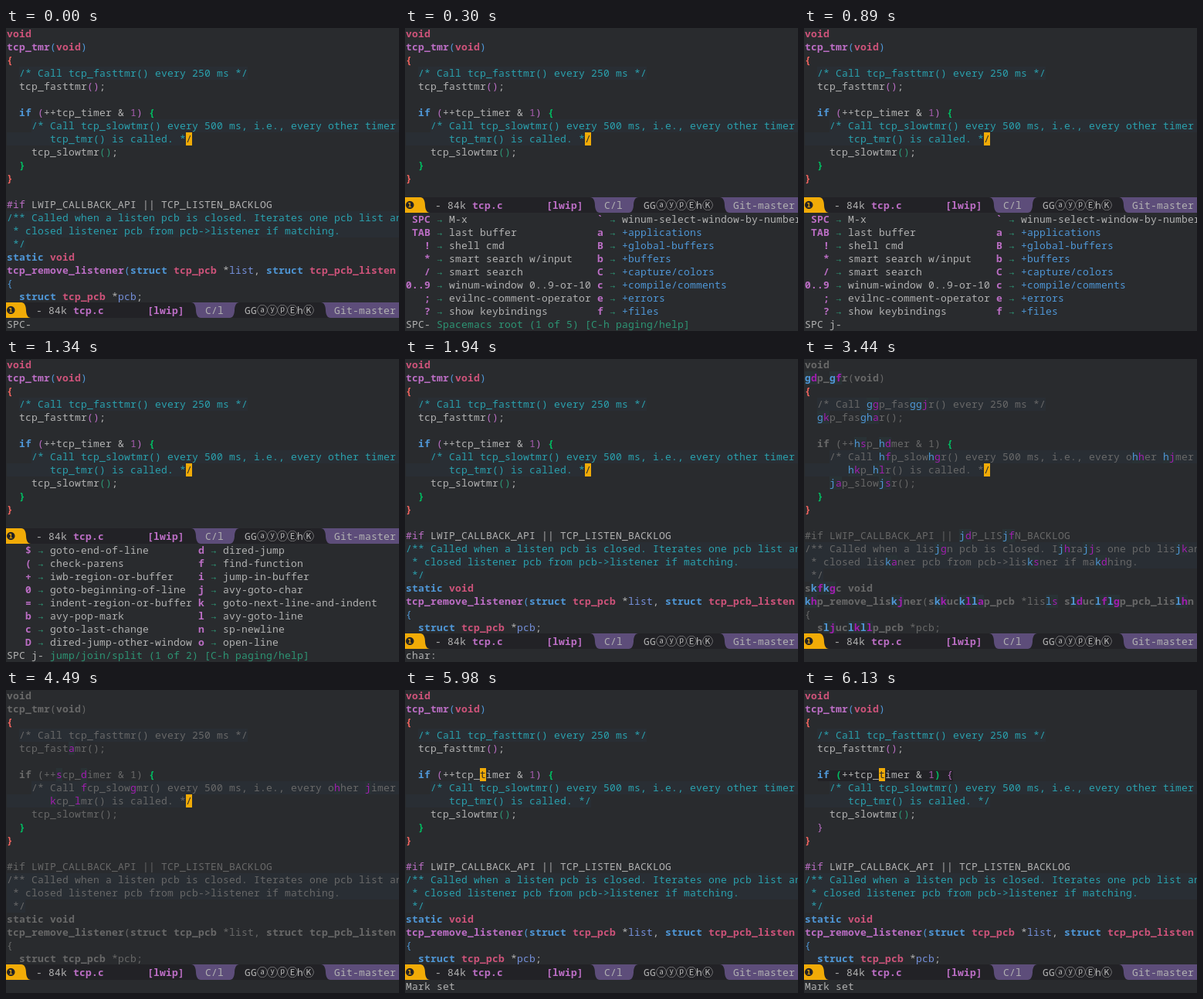
Write an HTML page with a canvas that moves like this. It is 509 px wide and 392 px high and loops after 8480 ms.

```html
<!DOCTYPE html>
<html lang="en">
<meta charset="utf-8">
<title>Jump to a character</title>
<style>
  html, body { margin: 0; width: 100%; height: 100%; overflow: hidden; background: #292b2e; }
  canvas { display: block; }
</style>
<canvas id="stage" width="509" height="392"></canvas>
<script>
const ctx = document.getElementById('stage').getContext('2d');
const W = 509, H = 392, CELL = 8, ROW = 17, LEFT = 1, LOOP = 8480;
const BG = '#292b2e', FG = '#b2b2b2', DIM = '#686868', BAR = '#222226', PURPLE = '#5d4d7a',
  YELLOW = '#f1ab07', BLUE = '#4f97d7', PINK = '#bc6ec5', GREEN = '#2d9574',
  COMMENT_BG = '#292e34', LABEL_BG = '#293235', LABEL = '#a31db1';
const MONO = '"Noto Sans Mono", "DejaVu Sans Mono", monospace';
const SYMBOLS = '"DejaVu Sans", "Noto Sans CJK JP", sans-serif';

// style letter -> [colour, bold]
const STYLES = {
  '.': [FG], c: ['#2aa1ae'], k: [BLUE, 1], f: [PINK, 1], t: ['#ce537a', 1], v: ['#7590db'],
  p: [PINK], n: ['#a45bad'], 1: [BLUE], 2: [PINK], 3: [GREEN],
  r: ['#f2645f', 1], g: ['#00bd62', 1], q: [PINK],
};

// segments are split by ~ and start with their style letter
const CODE = [
  'tvoid',
  'ftcp_tmr~1(~tvoid~1)',
  'r{',
  '.  ~c/* Call tcp_fasttmr() every 250 ms */',
  '.  tcp_fasttmr~2()~.;',
  '',
  '.  ~kif~. ~q(~.++tcp_timer & ~n1~q)~. ~g{',
  '.    ~c/* Call tcp_slowtmr() every 500 ms, i.e., every other timer',
  'c       tcp_tmr() is called. */',
  '.    tcp_slowtmr~3()~.;',
  '.  ~g}',
  'r}',
  '',
  'p#if~. LWIP_CALLBACK_API || TCP_LISTEN_BACKLOG',
  'c/** Called when a listen pcb is closed. Iterates one pcb list and the',
  'c * closed listener pcb from pcb->listener if matching.',
  'c */',
  'kstatic~. ~tvoid',
  'ftcp_remove_listener~1(~kstruct~. ~ttcp_pcb~. *~vlist~., ~kstruct~. ~ttcp_pcb_listen',
  '1{',
  '.  ~kstruct~. ~ttcp_pcb~. *~vpcb~.;',
].map(line => line.split('~').flatMap(s => [...s.slice(1)].map(ch => ({ ch, style: s[0] }))));

// two-key jump labels for every "t", in reading order
const KEYS = 'asdfghjkl';
const LABELS = [];
CODE.forEach((line, row) => line.forEach(({ ch }, col) => {
  if (!/t/i.test(ch)) return;
  const n = LABELS.length + 38;
  LABELS.push({ row, col, keys: KEYS[Math.floor(n / 9)] + KEYS[n % 9] });
}));

// rows of: key, text, key, text
const ROOT_KEYS = [
  ['SPC', 'M-x', '`', 'winum-select-window-by-number'],
  ['TAB', 'last buffer', 'a', '+applications'],
  ['!', 'shell cmd', 'B', '+global-buffers'],
  ['*', 'smart search w/input', 'b', '+buffers'],
  ['/', 'smart search', 'C', '+capture/colors'],
  ['0..9', 'winum-window 0..9-or-10', 'c', '+compile/comments'],
  [';', 'evilnc-comment-operator', 'e', '+errors'],
  ['?', 'show keybindings', 'f', '+files'],
];
const JUMP_KEYS = [
  ['$', 'goto-end-of-line', 'd', 'dired-jump'],
  ['(', 'check-parens', 'f', 'find-function'],
  ['+', 'iwb-region-or-buffer', 'i', 'jump-in-buffer'],
  ['0', 'goto-beginning-of-line', 'j', 'avy-goto-char'],
  ['=', 'indent-region-or-buffer', 'k', 'goto-next-line-and-indent'],
  ['b', 'avy-pop-mark', 'l', 'avy-goto-line'],
  ['c', 'goto-last-change', 'n', 'sp-newline'],
  ['D', 'dired-jump-other-window', 'o', 'open-line'],
];

const SCENES = [
  { at: 0, echo: 'SPC-' },
  { at: 300, keys: ROOT_KEYS, echo: 'SPC-', hint: 'Spacemacs root (1 of 5) [C-h paging/help]' },
  { at: 890, keys: ROOT_KEYS, echo: 'SPC j-' },
  { at: 1340, keys: JUMP_KEYS, echo: 'SPC j-', hint: 'jump/join/split (1 of 2) [C-h paging/help]' },
  { at: 1940, echo: 'char:' },
  { at: 3440, dim: true, typed: '' },
  { at: 4490, dim: true, typed: 'h' },
  { at: 5980, moved: true, echo: 'Mark set' },
  { at: 6130, moved: true, settled: true, echo: 'Mark set' },
];

function box(color, x, y, w, h) {
  ctx.fillStyle = color;
  ctx.fillRect(x, y, w, h);
}

function text(str, x, y, color, bold) {
  ctx.font = `${bold ? 'bold ' : ''}13px ${MONO}`;
  ctx.fillStyle = color;
  [...str].forEach((ch, i) => ctx.fillText(ch, x + i * CELL, y));
}

function symbol(ch, x, y, color, size) {
  ctx.font = `${size}px ${SYMBOLS}`;
  ctx.fillStyle = color;
  ctx.fillText(ch, x, y);
}

const colX = col => LEFT + col * CELL;
const rowY = row => row * ROW - 1;

function drawCell(row, col, ch, color, bold, bg) {
  if (bg) box(bg, colX(col), rowY(row), CELL, ROW);
  text(ch, colX(col), rowY(row) + 13, color, bold);
}

function styleOf(style, scene) {
  if (scene.settled && 'gq'.includes(style)) return STYLES[style === 'g' ? 'q' : 'g'];
  const [color, bold] = STYLES[style];
  return [scene.dim && !'rg'.includes(style) ? DIM : color, bold];
}

function drawCode(scene) {
  if (scene.settled) box('#222226', 18, 104, 175, 14);
  CODE.forEach((line, row) => {
    const last = line.at(-1);
    if (last && last.style === 'c' && last.ch !== '/')
      box(COMMENT_BG, colX(line.length), rowY(row), W, ROW);
    line.forEach(({ ch, style }, col) =>
      drawCell(row, col, ch, ...styleOf(style, scene), style === 'c' && COMMENT_BG));
  });
  if (scene.dim) drawLabels(scene.typed);
  const [row, col] = scene.moved ? [6, 12] : [8, 29];
  drawCell(row, col, CODE[row][col].ch, BG, false, YELLOW);
}

function drawLabels(typed) {
  for (const { row, col, keys } of LABELS) {
    if (!keys.startsWith(typed)) continue;
    const bold = STYLES[CODE[row][col].style][1];
    const rest = keys.slice(typed.length);
    [...rest].forEach((ch, i) =>
      drawCell(row, col + i, ch, i < rest.length - 1 ? BLUE : LABEL, bold, LABEL_BG));
  }
}

// mode-line segment with wavy ends; a and b are the top and bottom x of each end
function segment(color, y, [a0, b0], [a1, b1]) {
  const top = y, end = y + 20, mid = y + 10;
  ctx.fillStyle = color;
  ctx.beginPath();
  ctx.moveTo(a0, top);
  ctx.lineTo(a1, top);
  ctx.bezierCurveTo((a1 + b1) / 2, top, (a1 + b1) / 2, mid, (a1 + b1) / 2, mid);
  ctx.bezierCurveTo((a1 + b1) / 2, mid, (a1 + b1) / 2, end, b1, end);
  ctx.lineTo(b0, end);
  ctx.bezierCurveTo((a0 + b0) / 2, end, (a0 + b0) / 2, mid, (a0 + b0) / 2, mid);
  ctx.bezierCurveTo((a0 + b0) / 2, mid, (a0 + b0) / 2, top, a0, top);
  ctx.fill();
}

function drawModeLine(y) {
  const base = y + 15;
  box(BAR, 0, y, W, 20);
  segment(YELLOW, y, [0, 0], [20, 32]);
  segment(PURPLE, y, [240, 252], [302, 290]);
  segment(PURPLE, y, [408, 420], [W, W]);
  symbol('❶', 0, base, BAR, 14);
  text('- 84k', 39, base, FG);
  text('tcp.c', 87, base, PINK, true);
  text('[lwip]', 183, base, PINK, true);
  text('C/l', 258, base, FG);
  text('GG', 309, base, FG);
  [...'ⓐⓨⓟⒺ'].forEach((ch, i) => symbol(ch, 325 + i * 13, base, FG, 14));
  text('h', 377, base, FG);
  symbol('Ⓚ', 385, base, FG, 14);
  text('Git-master', 425, base, FG);
}

function drawKeys(rows) {
  box(BG, 0, 239, W, H);
  rows.forEach((row, i) => {
    const y = 252 + i * ROW;
    [[0, 4], [2, 32]].forEach(([n, col]) => {
      const key = row[n], label = row[n + 1];
      text(key, colX(col - key.length), y, PINK, true);
      text('→', colX(col + 1), y, GREEN);
      text(label, colX(col + 3), y, label[0] === '+' ? BLUE : FG);
    });
  });
}

function draw(scene) {
  box(BG, 0, 0, W, H);
  drawCode(scene);
  if (scene.keys) drawKeys(scene.keys);
  drawModeLine(scene.keys ? 219 : 355);
  box(BG, 0, 375, W, ROW);
  const echo = scene.echo || '';
  text(echo, colX(0), 388, FG);
  if (scene.hint) text(scene.hint, colX(echo.length + 1), 388, GREEN);
}

function frame() {
  const t = performance.now() % LOOP;
  draw(SCENES.findLast(s => s.at <= t));
  requestAnimationFrame(frame);
}
frame();
</script>
</html>
```
